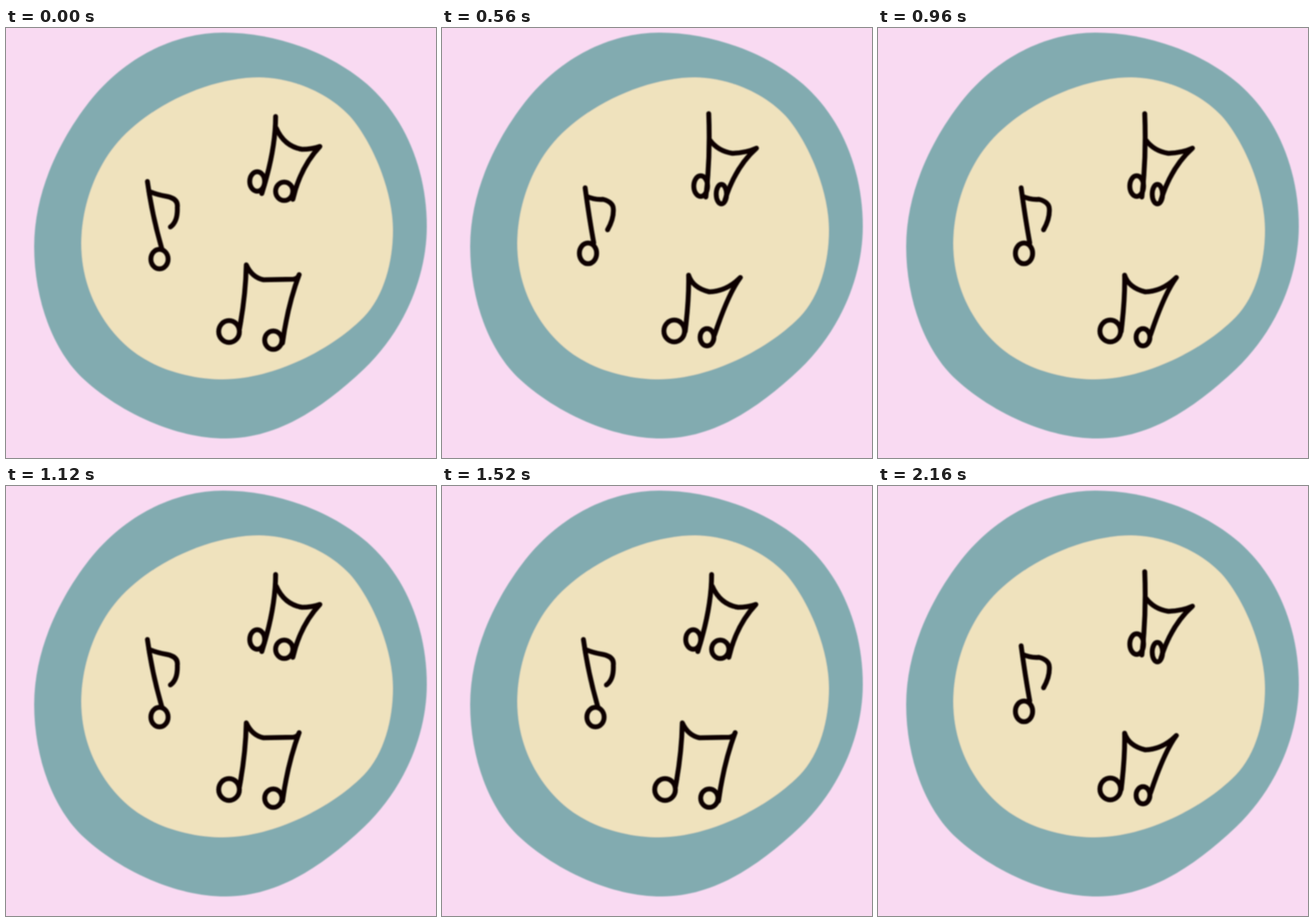
Recreate the animation shown at these times as an HTML page. Size 748 by 748 pixels, loop 2.4 s.

```html
<!DOCTYPE html>
<html lang="en">
<head>
<meta charset="utf-8">
<title>Dancing notes</title>
<style>
  html, body { margin: 0; width: 100%; height: 100%; overflow: hidden; background: #f9daf2; }
  svg { display: block; width: 100%; height: 100%; --up: 1; animation: beat 2400ms step-end infinite; }
  .rim { fill: #82abb0; }
  .face { fill: #efe2bd; }
  .pose { fill: none; stroke: #080605; stroke-width: 8.5; stroke-linecap: round; stroke-linejoin: round; }
  .up { opacity: var(--up); }
  .down { opacity: calc(1 - var(--up)); }

  /* the notes swap pose about every 200 ms */
  @keyframes beat {
    0%, 13.3333%, 30%, 46.6667%, 63.3333%, 80% { --up: 1; }
    6.6667%, 23.3333%, 40%, 56.6667%, 73.3333%, 90%, 100% { --up: 0; }
  }
</style>
</head>
<body>
<svg viewBox="0 0 748 748">
  <defs>
    <filter id="soft" filterUnits="userSpaceOnUse" x="0" y="0" width="748" height="748">
      <feGaussianBlur stdDeviation="1.2"/>
    </filter>
  </defs>

  <g filter="url(#soft)">
    <path class="rim" d="M378 8C300 8 214 45 150 122C98 186 49 280 49 380C49 470 80 556 130 606
      C190 664 290 714 382 714C470 714 548 664 623 593C693 526 732 432 732 345
      C732 255 700 165 635 104C570 44 470 8 378 8Z"/>
    <path class="face" d="M440 86C360 86 255 130 195 198C150 250 131 320 131 375C131 450 165 514 212 555
      C256 593 320 611 378 611C465 611 567 559 622 503C658 466 673 405 673 352
      C673 285 640 205 602 158C562 112 495 86 440 86Z"/>
  </g>

  <g class="pose up" filter="url(#soft)">
    <path d="M469 154Q469 212 445 288"/>
    <path d="M470 174Q484 206 515 211Q532 211 546 206Q512 242 499 298"/>
    <ellipse cx="437" cy="267" rx="13" ry="17"/>
    <ellipse cx="484" cy="284" rx="15" ry="16"/>

    <path d="M246 267Q254 325 271 384"/>
    <path d="M249 284Q262 290 280 293Q300 297 298 312Q299 337 286 346"/>
    <ellipse cx="267" cy="402" rx="15" ry="17"/>

    <path d="M406 524Q417 465 418 412Q428 434 448 438L500 437Q508 436 510 429Q490 482 481 548"/>
    <ellipse cx="388" cy="528" rx="18" ry="19"/>
    <ellipse cx="465" cy="543" rx="15" ry="16"/>
  </g>

  <g class="pose down" filter="url(#soft)">
    <path d="M464 149Q467 225 459 294"/>
    <path d="M466 195Q480 214 505 218Q530 217 547 209Q510 242 492 300"/>
    <ellipse cx="450" cy="275" rx="12" ry="18"/>
    <ellipse cx="486" cy="289" rx="9" ry="17"/>

    <path d="M249 278Q256 330 264 374"/>
    <path d="M252 293Q265 299 280 298Q298 303 298 315Q299 332 288 351"/>
    <ellipse cx="254" cy="392" rx="15" ry="18"/>

    <path d="M423 528Q430 470 429 430Q436 452 465 459Q495 458 519 434Q498 462 474 534"/>
    <ellipse cx="404" cy="527" rx="18" ry="19"/>
    <ellipse cx="461" cy="538" rx="12" ry="15"/>
  </g>
</svg>
</body>
</html>
```
